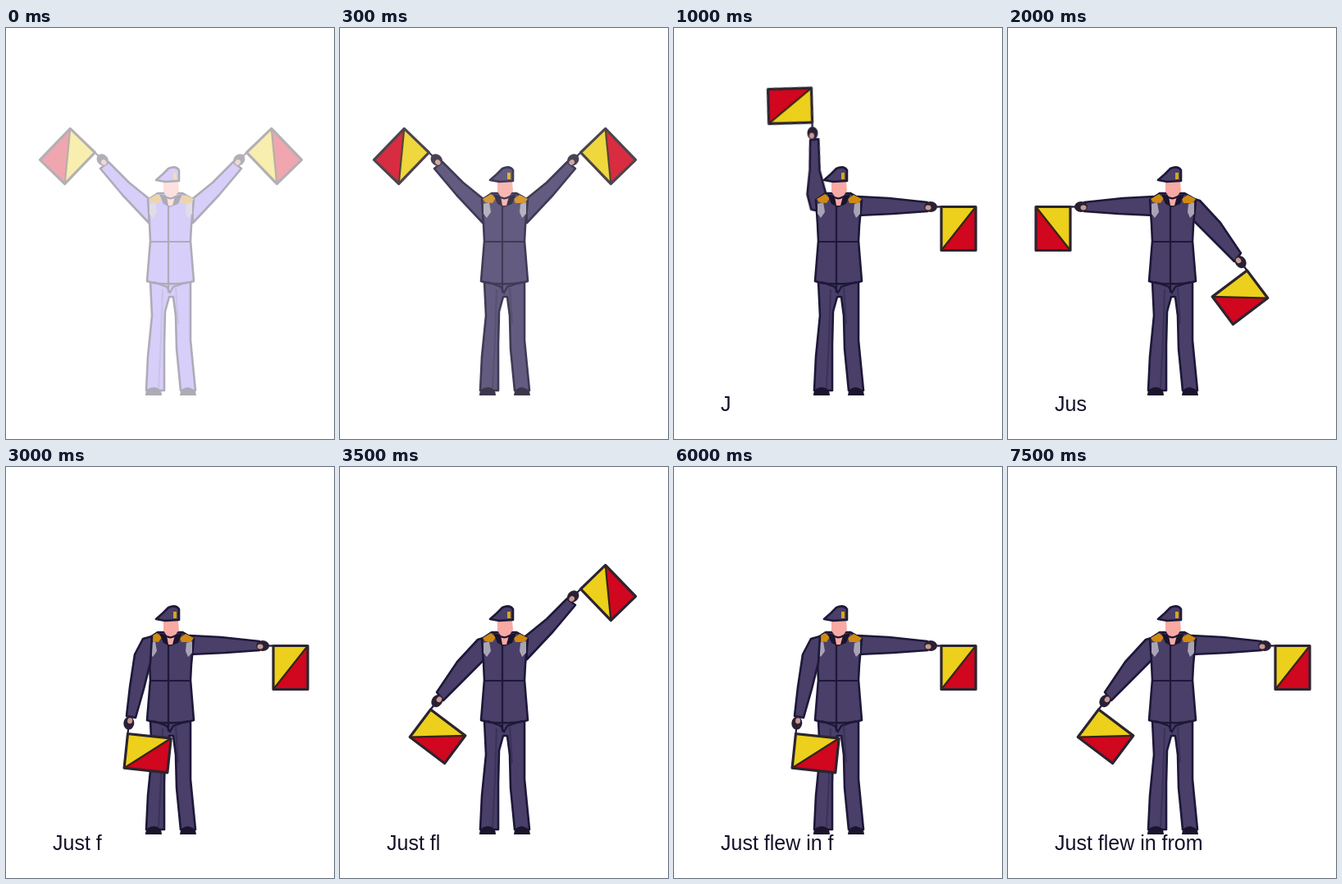
Write an HTML page without scripts that moves like this. It is 400 px wide and 500 px high and loops after 8 s.

```html
<!DOCTYPE html>
<html lang="en">
<head>
<meta charset="utf-8">
<title>Semaphore</title>
<style>
  html, body { margin: 0; width: 100%; height: 100%; overflow: hidden; background: #fff; }
  svg { display: block; width: 100vw; height: 100vh; }
  text { font: 25px "Liberation Sans", Arial, sans-serif; fill: #14102a; transform: translate(57px, 465.5px); }
  .cloth { fill: var(--cloth, #493f69); stroke: #1d1838; stroke-width: 2.6; stroke-linejoin: round; }
  .line { fill: none; stroke: #1d1838; stroke-width: 2.2; }
  .dark { fill: #1a142c; }
  .skin { fill: #f7aaa4; }
  .gold { fill: #d08a10; }
  .patch { fill: #a9a4b4; }
  .mirror { transform: translate(402px, 0) scale(-1, 1); }

  /* Each letter owns one half-second slot of the 8 s loop. */
  .pose { visibility: hidden; animation: slot 8s calc(var(--i) * .5s - 8s) step-end infinite; }
  @keyframes slot {
    0% { visibility: visible; }
    6.25%, 100% { visibility: hidden; }
  }
  .intro { opacity: 0; animation: intro 8s step-end infinite; }
  @keyframes intro {
    0% { opacity: .36; --cloth: #9276f1; }
    1.25% { opacity: .52; --cloth: #6f5cb0; }
    2.5% { opacity: .7; --cloth: #493f69; }
    3.75% { opacity: .85; --cloth: #493f69; }
    5% { opacity: 1; --cloth: #493f69; }
    6.25% { opacity: .85; --cloth: #493f69; }
    7.5% { opacity: .7; --cloth: #3a3050; }
    8.75% { opacity: .45; --cloth: #3a3050; }
    10% { opacity: .25; --cloth: #3a3050; }
    11.25%, 100% { opacity: 0; --cloth: #493f69; }
  }
</style>
</head>
<body>
<svg viewBox="0 0 400 500">
  <defs>
    <!-- Flag with stick along +x and the hand behind it -->
    <g id="flag">
      <path d="M-14 0H0" class="line"/>
      <path d="M0 0H42V-53H0Z" fill="#d1061f"/>
      <path d="M0 0H42L0 -53Z" fill="#ecd01c"/>
      <path d="M42 0L0 -53" stroke="#33250f" stroke-width="2.2"/>
      <path d="M0 0H42V-53H0Z" fill="none" stroke="#2b2430" stroke-width="3.2" stroke-linejoin="round"/>
      <ellipse cx="-13" rx="8" ry="6.5" fill="#2a2034"/>
      <ellipse cx="-16" cy="-1" rx="3.5" ry="3" fill="#c99990"/>
    </g>

    <!-- Arm positions for the left side of the stage -->
    <g id="hi">
      <path class="cloth" d="M176 209L150 188L125 163L115 171L142 203L174 237Z"/>
      <use href="#flag" transform="translate(108.5 151.5) rotate(224)"/>
    </g>
    <g id="side">
      <path class="cloth" d="M178 205L140 207L93 212V223L135 226L178 228Z"/>
      <use href="#flag" transform="translate(76 217.5) rotate(180)"/>
    </g>
    <g id="low">
      <path class="cloth" d="M178 207L168 210L143 237L118 274L126 284L150 260L176 234Z"/>
      <use href="#flag" transform="translate(110.5 295) rotate(127)"/>
    </g>
    <g id="down">
      <path class="cloth" d="M178 206L167 209L157 228L151 268L147 303L158 305L168 270L176 238Z"/>
      <use href="#flag" transform="translate(148.5 324.5) rotate(96)"/>
    </g>
    <g id="up">
      <path class="cloth" d="M180 228L168 226L162 208L163 178L161 142L171 140L175 178L184 204Z"/>
      <use href="#flag" transform="translate(162 120.5) rotate(264.5)"/>
    </g>
    <g id="top"><use href="#up" transform="translate(0 -5) rotate(4 172 215)"/></g>
    <g id="cross-low">
      <path class="cloth" d="M222 207L230 211L229 233L203 252L163 267L158 258L184 239Z"/>
      <use href="#flag" transform="translate(141 277.5) rotate(136)"/>
    </g>
    <g id="cross-hi">
      <path class="cloth" d="M227 209L198 186L169 153L160 161L188 200L222 232L229 226Z"/>
      <use href="#flag" transform="translate(153 143) rotate(224)"/>
    </g>

    <g id="body">
      <path class="cloth" d="M176 308L178 350L173 400L171 441H193L193 385L194 345L199 327H204L207 350L208 390L213 441H231L225 380L225 308Z"/>
      <path class="line" d="M191 318L189 380L186 438M207 316L210 360" stroke-width="1" opacity=".3"/>
      <path class="dark" d="M170 447Q170 437 181 437Q190 438 190 447ZM212 447Q213 437 222 437Q232 439 232 447Z"/>
      <path class="cloth" d="M173 209L185 201H215L229 209L226 240L225 259L229 308Q215 312 199 311Q184 312 172 308L176 259L175 238Z"/>
      <path class="line" d="M176 260H226M198 216V322"/>
      <path class="line" d="M180 309L196 315L200 322L204 315L222 309" stroke-width="1.5"/>
      <path class="patch" d="M175 214L182 212L184 224L179 231L175 226ZM220 214L227 212L227 226L222 231L219 224Z"/>
      <path class="gold" d="M174 208L184 202L190 207L186 213L177 212ZM212 208L219 203L229 208L225 213L214 213Z"/>
      <path class="dark" d="M187 202L196 204L200 218L192 214ZM215 202L206 204L200 218L210 214Z"/>
      <path class="skin" d="M192 187H210L211 198L206 205L203 216H198L196 205L192 199Z"/>
      <path class="line" d="M196 206Q201 209 207 205" stroke-width="1.5"/>
      <path class="cloth" d="M183 185L191 178L198 171Q207 167 211 173V186L194 187Z"/>
      <path d="M204 176H208V184H204Z" fill="#d9a514"/>
    </g>
  </defs>

  <g class="intro">
    <use href="#hi"/><use href="#hi" class="mirror"/><use href="#body"/>
  </g>
  <g class="pose" style="--i:2">
    <use href="#top"/><use href="#side" class="mirror"/><use href="#body"/>
    <text>J</text>
  </g>
  <g class="pose" style="--i:3">
    <use href="#hi"/><use href="#hi" class="mirror"/><use href="#body"/>
    <text>Ju</text>
  </g>
  <g class="pose" style="--i:4">
    <use href="#side"/><use href="#low" class="mirror"/><use href="#body"/>
    <text>Jus</text>
  </g>
  <g class="pose" style="--i:5">
    <use href="#hi"/><use href="#top" class="mirror"/><use href="#body"/>
    <text>Just</text>
  </g>
  <g class="pose" style="--i:6">
    <use href="#side" class="mirror"/><use href="#body"/><use href="#down"/>
    <text>Just f</text>
  </g>
  <g class="pose" style="--i:7">
    <use href="#low"/><use href="#hi" class="mirror" y="-3"/><use href="#body"/>
    <text>Just fl</text>
  </g>
  <g class="pose" style="--i:8">
    <use href="#hi" class="mirror" y="-3"/><use href="#body"/><use href="#down"/>
    <text>Just fle</text>
  </g>
  <g class="pose" style="--i:9">
    <use href="#side" class="mirror"/><use href="#body"/><use href="#cross-hi" class="mirror"/>
    <text>Just flew</text>
  </g>
  <g class="pose" style="--i:10">
    <use href="#up"/><use href="#body"/><use href="#cross-low"/>
    <text>Just flew i</text>
  </g>
  <g class="pose" style="--i:11">
    <use href="#low"/><use href="#low" class="mirror"/><use href="#body"/>
    <text>Just flew in</text>
  </g>
  <g class="pose" style="--i:12">
    <use href="#side" class="mirror"/><use href="#body"/><use href="#down"/>
    <text>Just flew in f</text>
  </g>
  <g class="pose" style="--i:13">
    <use href="#side"/><use href="#side" class="mirror"/><use href="#body"/>
    <text>Just flew in fr</text>
  </g>
  <g class="pose" style="--i:14">
    <use href="#side"/><use href="#body"/><use href="#cross-hi" y="6"/>
    <text>Just flew in fro</text>
  </g>
  <g class="pose" style="--i:15">
    <use href="#low"/><use href="#side" class="mirror"/><use href="#body"/>
    <text>Just flew in from</text>
  </g>
</svg>
</body>
</html>
```
